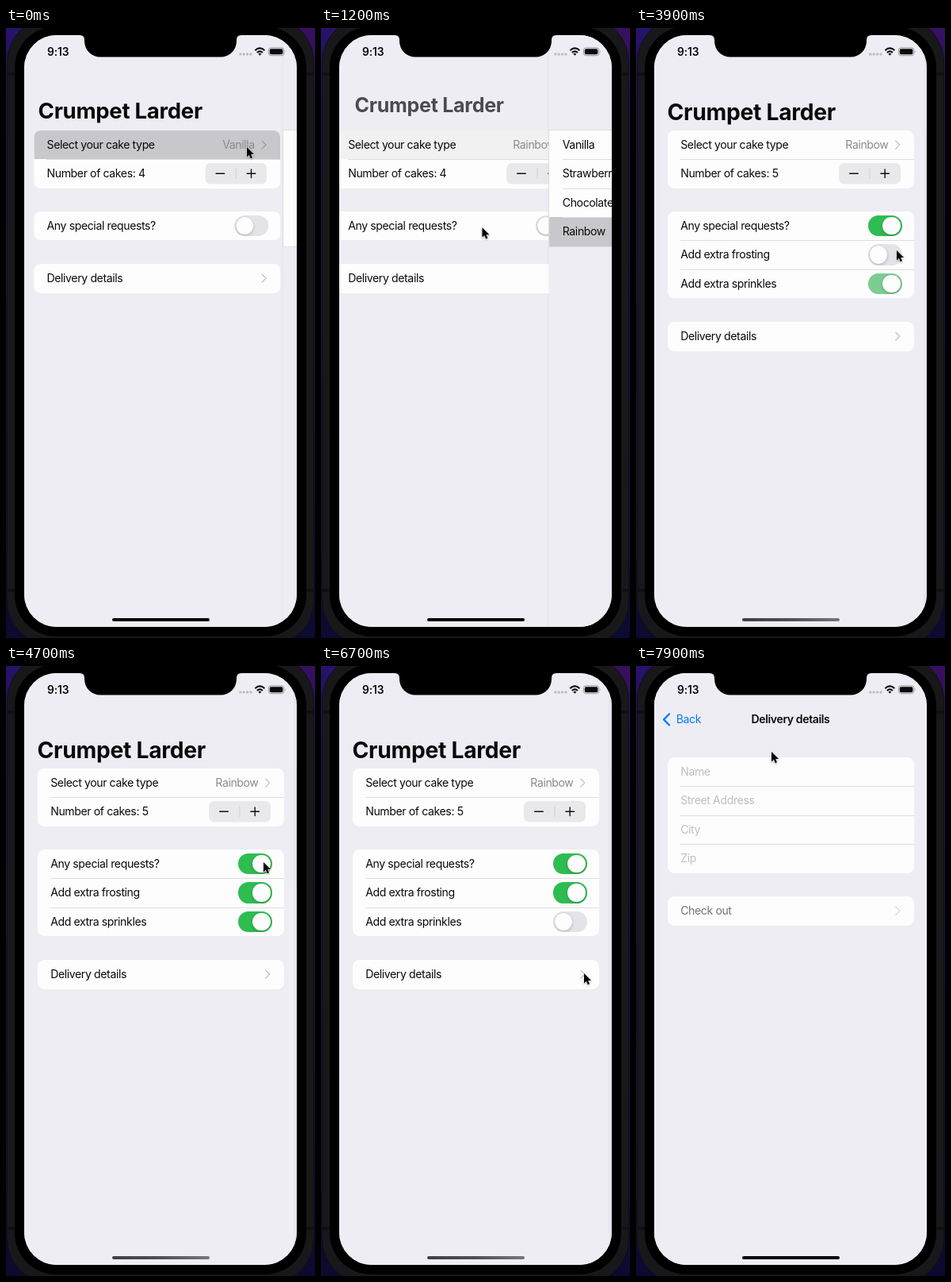
These frames come from a looping animation (390 by 768 pixels, 8000 ms). An HTML page:

```html
<!DOCTYPE html>
<html lang="en">
<head>
<meta charset="utf-8">
<title>Cake order</title>
<style>
  :root {
    --row: 36.55px; --pad: 16.7px;
    --a: 0; --b: 0; --q: 0; --e: 0;
  }
  html, body { margin: 0; width: 100%; height: 100%; overflow: hidden; background: #0c0a30; }
  body { font: 14.1px/36.55px Inter, "Liberation Sans", sans-serif; letter-spacing: -.4px; color: #0a0a0b; white-space: nowrap; }
  .stage { position: relative; width: 390px; height: 768px; overflow: hidden;
    background: linear-gradient(transparent, #0c0a30), linear-gradient(90deg, #28126a, #371060); }
  .stage div, .stage svg, .stage i, .stage span { position: absolute; box-sizing: border-box; }
  .body { left: 1px; top: -14px; width: 388px; height: 792px; border-radius: 57px; background: #18181a; border: 1px solid #0f0e16; }
  .bezel { left: 11px; top: -2px; width: 368px; height: 768px; border-radius: 52px; background: #000; }
  .band { left: 1px; width: 388px; height: 4px; background: #101011; }
  .screen { left: 23px; top: 9px; width: 344px; height: 745px; border-radius: 41px; overflow: hidden; background: #eeedf3; }
  .page { inset: 0; background: #eeedf3; }
  .next { box-shadow: -1px 0 5px rgba(0,0,0,.05); }
  #main { transform: translateX(calc(-96px * var(--q))); }
  #picker { transform: translateX(calc(344px * (1 - var(--a)))); }
  #form { transform: translateX(calc(344px * (1 - var(--b)))); }

  .stage .card { left: 16.5px; width: 311px; border-radius: 8.5px; overflow: hidden; background: #fdfdfd; }
  .stage .wide { left: 0; width: 344px; border-radius: 0; box-shadow: 0 0 0 1px #e0dfe3; }
  .stage .row { position: relative; z-index: 0; height: var(--row); padding-left: var(--pad); }
  .row + .row::before, .slot::before { content: ""; position: absolute; z-index: 1; left: var(--pad); right: 0; top: 0; height: 1px; background: #dedee1; }
  .stage .slot { position: relative; height: calc(var(--row) * var(--e)); overflow: hidden; }
  .slot::before { opacity: calc(var(--e) * 6); }
  .stage .slot .row { position: absolute; bottom: 0; left: 0; right: 0; }
  .stage .hi { inset: 0; z-index: -1; background: #c8c7cc; }
  .value { right: 32px; color: #8a8a8e; }
  .more { right: 19px; top: 14.4px; width: 7.6px; height: 7.6px; border: solid rgba(60,60,67,.38); border-width: 1.7px 1.7px 0 0; transform: rotate(45deg); }
  .hint { color: #bfbfc3; }
  .off { color: #747477; }
  .off .more { border-color: #d0d0d3; }

  .sw { right: 14.8px; top: 5.1px; width: 43px; height: 26.4px; border-radius: 13.2px; background: #e4e3e8; overflow: hidden; }
  .sw::before { content: ""; position: absolute; inset: 0; background: #2fbd52; opacity: var(--c); }
  .sw::after { content: ""; position: absolute; top: 2px; left: calc(2px + 16.6px * var(--k)); width: 22.4px; height: 22.4px;
    border-radius: 50%; background: #fdfdfd; box-shadow: 0 2px 4px rgba(0,0,0,.16), 0 0 1px rgba(0,0,0,.25); }
  .step { right: 16.4px; top: 5.3px; }

  .large { left: 16.5px; top: 77px; font-weight: 700; font-size: 28.25px; line-height: 40px; letter-spacing: -.3px; transform-origin: 0 50%;
    transform: translate(calc(11px * var(--q)), calc(-38px * var(--q))) scale(calc(1 - .5 * var(--q))); opacity: calc(1.08 - 1.6 * var(--q)); }
  .nav { top: 40px; color: #0a7aff; }
  .back { left: 27.7px; transform-origin: 0 50%; }
  #backA { opacity: calc(1.3 * var(--a) - .3);
    transform: translate(calc(-11px * (1 - var(--a))), calc(38px * (1 - var(--a)))) scale(calc(2 - var(--a))); }
  #backB { opacity: calc(1.3 * var(--b) - .3); transform: translateX(calc(90px * (1 - var(--b)))); }
  #inline { left: 0; width: 344px; text-align: center; color: #0a0a0b; font-weight: 600;
    opacity: calc(1.3 * var(--b) - .3); transform: translateX(calc(170px * (1 - var(--b)))); }
  #arrow { left: 0; top: 0; opacity: calc(1.3 * var(--q) - .3); }
  .clock { left: 52px; top: 20px; font-weight: 600; font-size: 13.8px; line-height: 20px; letter-spacing: -.1px; }
  #home { left: 134px; top: 743px; width: 122.5px; height: 4px; border-radius: 2px; background: #050505; }
  #home.dim { background: linear-gradient(90deg, #404042, #505052 50%, #777779); }
  #cursor { left: -4px; top: -4px; overflow: visible; filter: drop-shadow(0 1px 1px rgba(0,0,0,.3)); }
</style>
</head>
<body>
<div class="stage">
  <div class="body"></div>
  <div class="band" style="top:56px"></div>
  <div class="band" style="top:706px"></div>
  <div class="bezel"></div>

  <div class="screen">
    <div class="page" id="main">
      <div class="card" style="top:119.5px">
        <div class="row"><i class="hi" id="hiType"></i>Select your cake type<span class="value" id="type"></span><i class="more"></i></div>
        <div class="row">Number of cakes: <b id="count" style="font-weight:400"></b>
          <svg class="step" width="78.1" height="26.6" viewBox="0 0 78.1 26.6">
            <rect width="78.1" height="26.6" rx="7" fill="#e9e9eb"/>
            <path d="M39 6.5v13.6" stroke="#d0d0d3"/>
            <path d="M13.7 13.3h10.6M52.9 13.3h10.6M58.2 8v10.6" stroke="#111" stroke-width="1.4" stroke-linecap="round"/>
          </svg>
        </div>
      </div>
      <div class="card" style="top:221.8px">
        <div class="row">Any special requests?<i class="sw" id="special"></i></div>
        <div class="slot"><div class="row">Add extra frosting<i class="sw" id="frosting"></i></div></div>
        <div class="slot"><div class="row">Add extra sprinkles<i class="sw" id="sprinkles"></i></div></div>
      </div>
      <div class="card" style="top:calc(288px + 2 * var(--row) * var(--e))">
        <div class="row"><i class="hi" id="hiDelivery"></i>Delivery details<i class="more"></i></div>
      </div>
    </div>

    <div class="page next" id="picker">
      <div class="card wide" style="top:119.8px">
        <div class="row">Vanilla</div>
        <div class="row">Strawberry</div>
        <div class="row">Chocolate</div>
        <div class="row"><i class="hi" id="hiPick"></i>Rainbow</div>
        <svg id="tick" style="left:310px;top:0" width="16" height="36" viewBox="0 0 16 36">
          <path d="M2 19l4 5 7.5-11.5" fill="none" stroke="#0a7aff" stroke-width="1.9" stroke-linecap="round" stroke-linejoin="round"/>
        </svg>
      </div>
    </div>

    <div class="page next" id="form">
      <div class="card hint" style="top:105.5px">
        <div class="row">Name</div>
        <div class="row">Street Address</div>
        <div class="row">City</div>
        <div class="row">Zip</div>
      </div>
      <div class="card off" style="top:281px">
        <div class="row">Check out<i class="more"></i></div>
      </div>
    </div>

    <div class="large">Crumpet Larder</div>
    <svg id="arrow" width="40" height="80" viewBox="0 0 40 80">
      <path d="M19 51.4l-7 7 7 7" fill="none" stroke="#0a7aff" stroke-width="2.2" stroke-linecap="round" stroke-linejoin="round"/>
    </svg>
    <div class="nav back" id="backA">Crumpet Larder</div>
    <div class="nav back" id="backB">Back</div>
    <div class="nav" id="inline">Delivery details</div>
  </div>

  <svg width="390" height="60" viewBox="0 0 390 60" style="left:0;top:0">
    <path d="M93 8v1q6 0 6 6v1.5a20 20 0 0 0 20 20h152a20 20 0 0 0 20-20v-1.5q0-6 6-6v-1z"/>
    <g fill="#bdbcc2"><circle cx="295.8" cy="33" r="1.7"/><circle cx="300.2" cy="33" r="1.7"/><circle cx="304.6" cy="33" r="1.7"/><circle cx="309" cy="33" r="1.7"/></g>
    <g fill="none" stroke="#0a0a0b" stroke-width="2">
      <path d="M314.4 28.2q6-5.6 12 0M316.8 31q3.6-3.2 7.2 0"/>
    </g>
    <path d="M318.4 32.5q2-1.5 4 0l-2 2.2z" fill="#0a0a0b"/>
    <rect x="331.4" y="24.9" width="19.4" height="9.8" rx="3" fill="none" stroke="#8e8e92" stroke-width=".9"/>
    <rect x="332.8" y="26.3" width="16.6" height="7" rx="1.7" fill="#0a0a0b"/>
    <path d="M352 28.3q1.4 1.5 0 3z" fill="#8e8e92"/>
  </svg>
  <div class="clock">9:13</div>
  <div id="home"></div>
  <svg id="cursor" width="20" height="26" viewBox="-4 -4 20 26">
    <path d="M0 0v12.4l2.8-2.6 2 4.5 2.2-1-1.9-4.2h4z" fill="#000" stroke="#fff" stroke-width="1" stroke-linejoin="round" paint-order="stroke"/>
  </svg>
</div>

<script>
const LOOP = 8000, STEP = 100;
const $ = id => document.getElementById(id);
const root = document.documentElement.style;

const linear = p => p;
const smooth = p => p * p * (3 - 2 * p);
const easeOut = p => 1 - (1 - p) ** 3;
const decay = p => 1 - (1 + 8.4 * p) * Math.exp(-8.4 * p);
const spring = p => decay(p) / decay(1);

// Value that turns on and off in turn at the given times.
function flip(t, times, dur, ease) {
  let v = 0;
  times.forEach((at, i) => {
    if (t < at) return;
    const p = ease(Math.min(1, (t - at) / dur));
    v = i % 2 ? 1 - p : p;
  });
  return v;
}

// Cursor stops: time, x, y
const stops = [
  [0, 304, 150], [100, 303, 151], [600, 202, 252], [1150, 202, 252],
  [1900, 313, 184], [2200, 313, 184], [2600, 301, 280], [2850, 316, 250],
  [3100, 316, 250], [3600, 326, 319], [3720, 326, 319], [3900, 329, 280],
  [4200, 329, 281], [4550, 325, 247], [5320, 325, 247], [5500, 333, 268],
  [5800, 330, 283], [6200, 330, 283], [6700, 332, 387], [6900, 331, 390],
  [7300, 331, 390], [7900, 171, 108]
];

function cursorAt(t) {
  const i = stops.findIndex(s => s[0] > t);
  if (i < 0) return stops[stops.length - 1].slice(1);
  const [t0, x0, y0] = stops[i - 1], [t1, x1, y1] = stops[i];
  const p = smooth((t - t0) / (t1 - t0));
  return [x0 + (x1 - x0) * p, y0 + (y1 - y0) * p];
}

const taps = {
  special: [2900, 4700, 5300],
  frosting: [4100, 4700, 5900],
  sprinkles: [3700, 4700]
};

function draw(t) {
  const a = flip(t, [-25, 1000], 600, spring);
  const b = flip(t, [7250], 600, spring);
  root.setProperty("--a", a);
  root.setProperty("--b", b);
  root.setProperty("--q", a + b);
  root.setProperty("--e", flip(t, taps.special, 365, smooth));

  for (const id in taps) {
    $(id).style.setProperty("--k", flip(t, taps[id], 200, easeOut));
    $(id).style.setProperty("--c", flip(t, taps[id], 350, linear));
  }

  const picked = t >= 1000;
  $("type").textContent = picked ? "Rainbow" : "Vanilla";
  $("tick").style.top = picked ? "109.65px" : "0";
  $("count").textContent = t < 2100 ? 4 : 5;
  $("hiType").style.opacity = picked ? a : 1;
  $("hiPick").style.opacity = t >= 900 && t < 1500 ? 1 : 0;
  $("hiDelivery").style.opacity = t >= 7200 ? 1 : 0;
  $("home").className = t >= 3500 && t < 7200 ? "dim" : "";

  const [x, y] = cursorAt(t);
  $("cursor").style.transform = `translate(${x}px, ${y}px)`;
}

const start = performance.now();
function tick() {
  const t = (performance.now() - start) % LOOP;
  draw(Math.floor(t / STEP) * STEP);
  requestAnimationFrame(tick);
}
tick();
</script>
</body>
</html>
```
